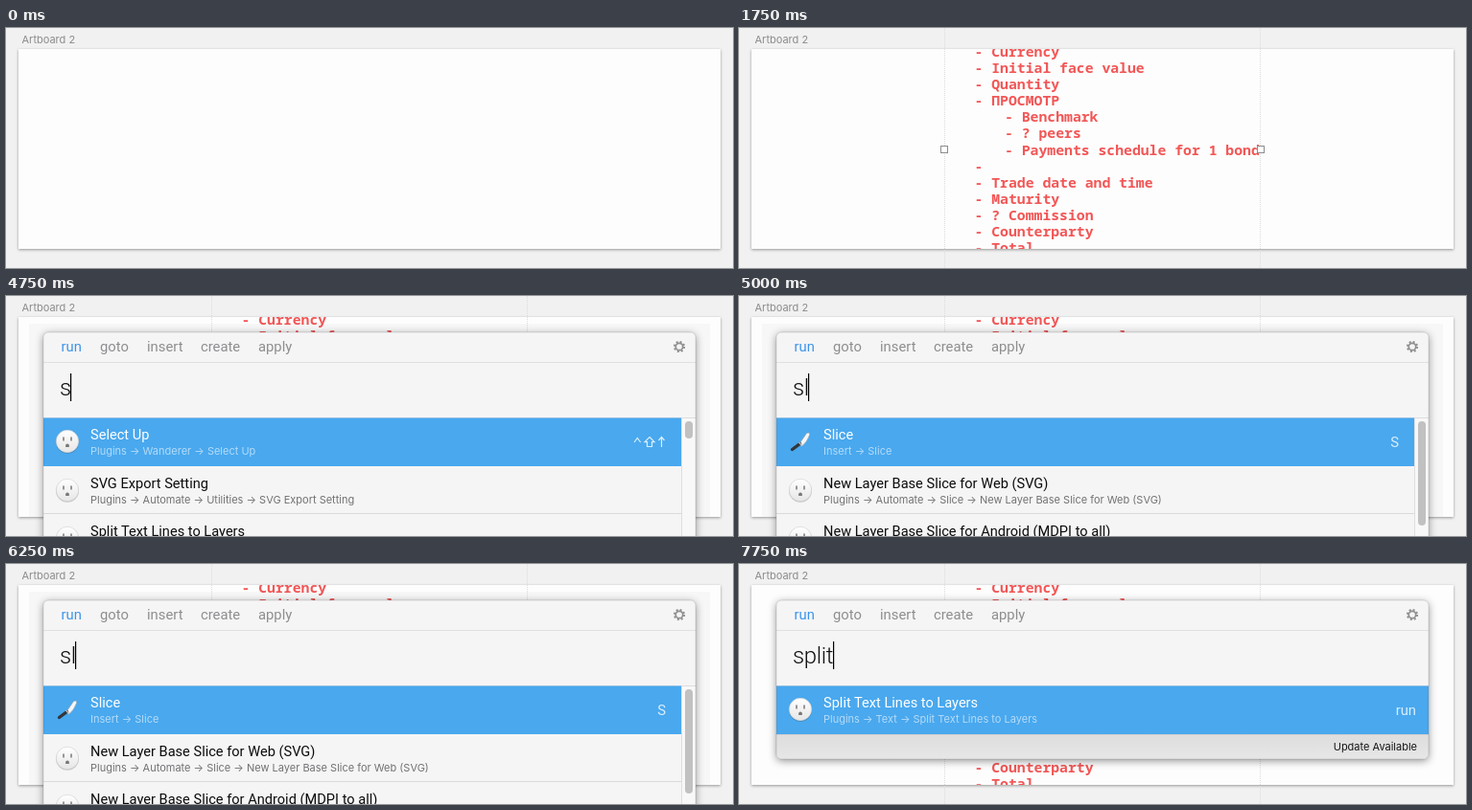
Animation, 758 px wide and 251 px high, one loop 8 s. Source, as an HTML page:

```html
<!DOCTYPE html>
<html lang="en">
<head>
<meta charset="utf-8">
<title>Plugin launcher</title>
<style>
html, body { margin: 0; width: 100%; height: 100%; overflow: hidden; background: #f1f1f1; }
svg { display: block; width: 758px; height: 251px; }
text { white-space: pre; }
.small { font: 400 11px Inter, sans-serif; }
.ui { font: 400 14.6px Roboto, sans-serif; }
.tab { font: 400 14.8px Roboto, sans-serif; }
.query { font: 300 24px Roboto, sans-serif; letter-spacing: -.4px; }
.hint { letter-spacing: -.6px; }
.mono { font: 700 14.77px "Noto Sans Mono", "DejaVu Sans Mono", monospace; fill: #f25656; }
.board { filter: drop-shadow(0 1px 1.5px rgba(0, 0, 0, .38)); }
.shadow { filter: drop-shadow(0 2px 4px rgba(0, 0, 0, .42)); }
</style>
</head>
<body>
<svg viewBox="0 0 758 251">
  <defs>
    <clipPath id="boardClip"><rect x="13" y="22" width="732" height="209"/></clipPath>
    <clipPath id="panelClip"><rect class="frame" x="39" y="38" width="680" height="166" rx="5"/></clipPath>
    <linearGradient id="footFill" x2="0" y2="1">
      <stop stop-color="#dedddE"/><stop offset="1" stop-color="#e8e7e8"/>
    </linearGradient>
    <linearGradient id="knobFill" x2="0" y2="1">
      <stop stop-color="#fff"/><stop offset="1" stop-color="#e6e6e6"/>
    </linearGradient>
    <g id="socket">
      <circle cy=".8" r="12" fill="#000" opacity=".2"/>
      <circle r="11.7" fill="url(#knobFill)" stroke="#cfcfcf" stroke-width=".6"/>
      <path d="M-4-4.5v4M4-4.5v4" stroke="#777" stroke-width="1.5"/>
      <path d="M-1.8 6V4.2a1.8 1.8 0 0 1 3.6 0V6z" fill="#777"/>
    </g>
    <g id="knife">
      <path d="M-1 2.5L6.5-8.5Q10.5-10 9.5-6.5Q7 1 1.5 5z" fill="#f4f6f8" stroke="#8b98a3" stroke-width=".6"/>
      <path d="M-8.5 8.5L-.5 2.5" stroke="#33363a" stroke-width="3.4" stroke-linecap="round"/>
      <path d="M-1.5 1L2 5" stroke="#b9bec3" stroke-width="1.4"/>
    </g>
    <g id="keys" fill="none" stroke="#d9eefc" stroke-width="1.2">
      <path d="M655 153l3.3-4.5 3.3 4.5"/>
      <path d="M671 147.5l5 5.2h-2.5v4.8h-5v-4.8H666z"/>
      <path d="M683.5 158v-10M680.5 151l3-3.5 3 3.5"/>
    </g>
  </defs>

  <rect width="758" height="251" fill="#f1f1f1"/>
  <text class="small" x="16.5" y="16" fill="#8b8b8b">Artboard 2</text>
  <rect class="board" x="13" y="22" width="732" height="209" fill="#fdfdfd"/>

  <g id="doc">
    <path d="M214.5 0V251M543.5 0V251" stroke="#dcdcdc" stroke-dasharray="1 1"/>
    <g id="lines" clip-path="url(#boardClip)"></g>
    <g fill="#fff" stroke="#8c8c8c">
      <rect x="210.5" y="123.5" width="7" height="7"/>
      <rect x="540.5" y="123.5" width="7" height="7"/>
    </g>
  </g>

  <g id="panel">
    <g clip-path="url(#boardClip)"><rect id="halo" x="24" y="29" width="710" height="193" fill="#000" opacity=".022"/></g>
    <rect class="frame shadow" x="39" y="38" width="680" height="166" rx="5" fill="#f6f5f6"/>
    <g clip-path="url(#panelClip)">
      <path d="M39 69.5H719" stroke="#e1e0e1"/>
      <path d="M39 127.5H719" stroke="#dddcdd"/>
      <g id="tabs"></g>
      <g id="gear" transform="translate(702 53)" fill="none" stroke="#8f8f91">
        <circle r="5.1" stroke-width="2" stroke-dasharray="2 2.005"/>
        <circle r="3.7" stroke-width="1.7"/>
      </g>
      <text id="query" class="query" x="56" y="104"></text>
      <g id="lists"></g>
      <g id="scroll">
        <rect x="704" y="128" width="15" height="123" fill="#f8f8f8"/>
        <path d="M704.5 128V251" stroke="#dfdedf"/>
        <rect id="thumb" x="708" y="131" width="8" height="18" rx="4" fill="#c1c1c1"/>
      </g>
      <g id="foot">
        <rect x="39" width="680" height="27" fill="url(#footFill)"/>
        <path d="M39 .5H719" stroke="#cfcecf"/>
        <text class="small" x="707" y="17.3" text-anchor="end" fill="#161616">Update Available</text>
      </g>
    </g>
    <rect class="frame" x="39" y="38" width="680" height="166" rx="5" fill="none" stroke="#000" stroke-opacity=".16" stroke-width=".7"/>
    <rect id="caret" y="81" width="1.2" height="29"/>
  </g>
</svg>
<script>
const $ = id => document.getElementById(id);
const show = (el, on) => el.setAttribute("display", on ? "inline" : "none");
const label = (cls, x, y, fill, str, extra = "") =>
  `<text class="${cls}" x="${x}" y="${y}" fill="${fill}" ${extra}>${str}</text>`;

// A leading tab marks a nested bullet.
const notes = ["Currency", "Initial face value", "Quantity", "ПРОСМОТР", "\tBenchmark", "\t? peers",
  "\tPayments schedule for 1 bond", "", "Trade date and time", "Maturity", "? Commission",
  "Counterparty", "Total"];
$("lines").innerHTML = notes.map((s, i) =>
  `<text class="mono" x="${s[0] === "\t" ? 277 : 245.5}" y="${30 + i * 17.09}">- ${s.trim()}</text>`).join("");

const tabs = [["run", 57.5], ["goto", 98], ["insert", 147], ["create", 203], ["apply", 263]];
$("tabs").innerHTML = tabs.map(([s, x], i) => label("tab", x, 58, i ? "#8e8d8f" : "#3b95ea", s)).join("");

const split = { name: "Split Text Lines to Layers", path: "Plugins → Text", side: "run" };
const select = { name: "Select Up", path: "Plugins → Wanderer", keys: true };
const svg = { name: "SVG Export Setting", path: "Plugins → Automate → Utilities" };
const slice = { name: "Slice", path: "Insert", side: "S", icon: "knife" };
const layer = kind => ({ name: `New Layer Base Slice for ${kind}`, path: "Plugins → Automate → Slice" });

// thumb: length of the scroll thumb, 0 for no scroll bar
const lists = {
  none: { rows: [], thumb: 0 },
  one: { rows: [split], thumb: 0 },
  s: { rows: [select, svg, split], thumb: 18 },
  sl: { rows: [slice, layer("Web (SVG)"), layer("Android (MDPI to all)")], thumb: 109 },
  sp: { rows: [split, svg, select], thumb: 0 }
};

function row(item, i, right) {
  const top = i ? 128 + i * 50 : 127, on = i === 0;
  let out = on ? `<rect x="39" y="127.5" width="${right - 39}" height="50.5" fill="#49a8ee"/>`
    : `<path d="M39 ${top + 49.5}H${right}" stroke="#dbdadb"/>`;
  out += `<use href="#${item.icon || "socket"}" x="64" y="${top + 25}"/>`;
  out += label("ui", 88, top + 23, on ? "#fff" : "#0c0c0c", item.name);
  out += label("small", 88, top + 39, on ? "#b4dbf8" : "#727173", `${item.path} → ${item.name}`);
  if (on && item.keys) out += `<use href="#keys"/>`;
  if (on && item.side) out += label("tab", right === 719 ? 706 : 688, 158, "#d9eefc", item.side, `text-anchor="end"`);
  return out;
}

for (const key in lists) {
  const { rows, thumb } = lists[key];
  const g = document.createElementNS("http://www.w3.org/2000/svg", "g");
  g.innerHTML = rows.map((r, i) => row(r, i, thumb ? 704 : 719)).join("");
  $("lists").append(g);
  lists[key].el = g;
}

// time, typed text, list, caret visible
const steps = [
  [3750, "", "one", 1], [4250, "", "one", 0], [4750, "s", "s", 1], [5000, "sl", "sl", 1],
  [5500, "slp", "none", 1], [6000, "slp", "none", 0], [6250, "sl", "sl", 1], [6750, "s", "s", 1],
  [7000, "sp", "sp", 1], [7250, "spl", "one", 1], [7500, "spli", "one", 1], [7750, "split", "one", 1]
];
const advance = { s: 11, l: 5, p: 14, i: 5, t: 7 };
const frames = document.querySelectorAll(".frame");

function draw(t) {
  show($("doc"), t >= 1750);
  const step = steps.filter(s => s[0] <= t).pop();
  show($("panel"), step);
  if (!step) return;
  const [, typed, key, caret] = step;
  const { rows, thumb } = lists[key];
  const tall = rows.length > 1;
  const footY = rows.length ? 178 : 127;
  for (const f of frames) f.setAttribute("height", tall ? 290 : footY + (rows.length ? 26 : 27) - 38);
  for (const k in lists) show(lists[k].el, k === key);
  show($("foot"), !tall);
  $("foot").setAttribute("transform", `translate(0 ${footY})`);
  show($("scroll"), thumb);
  $("thumb").setAttribute("height", thumb);
  show($("halo"), t < 7500);
  $("halo").setAttribute("height", t < 4750 ? 193 : 202);
  const q = $("query");
  q.textContent = typed || "Run a Plugin or Menu Action";
  q.setAttribute("class", typed ? "query" : "query hint");
  q.setAttribute("fill", typed ? "#111" : "#b3b2b4");
  $("caret").setAttribute("x", [...typed].reduce((x, c) => x + advance[c], 56));
  show($("caret"), caret);
}

const start = performance.now();
let last = -1;
function tick() {
  const t = Math.max(0, performance.now() - start) % 8000;
  const slot = Math.floor(t / 250);
  if (slot !== last) draw(slot * 250);
  last = slot;
  requestAnimationFrame(tick);
}
tick();
</script>
</body>
</html>
```
